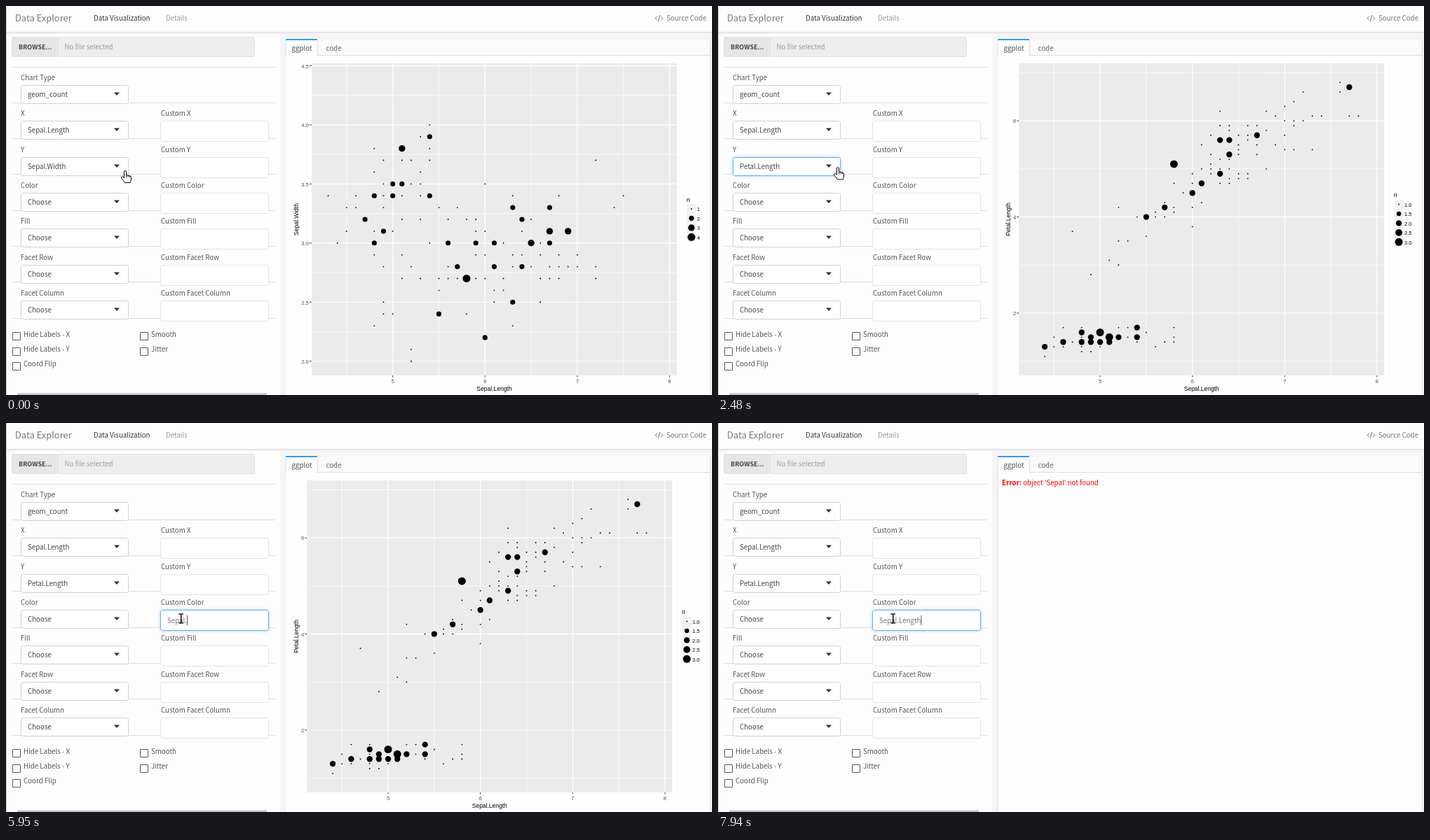
Animation, 1007 px wide and 556 px high, one loop 8000 ms. Source, as an HTML page with a canvas:

```html
<!DOCTYPE html>
<html lang="en">
<head>
<meta charset="utf-8">
<title>Data Explorer</title>
<style>
html, body { margin: 0; width: 100%; height: 100%; overflow: hidden; background: #fff; }
canvas { display: block; width: 1007px; height: 556px; }
</style>
</head>
<body>
<canvas id="stage"></canvas>
<script>
const W = 1007, H = 556, LOOP = 8000;
const canvas = document.getElementById('stage');
const ctx = canvas.getContext('2d');
const dpr = window.devicePixelRatio || 1;
canvas.width = W * dpr;
canvas.height = H * dpr;

const UI = '"Noto Sans CJK JP", "Noto Sans CJK SC", "Noto Sans CJK", "Noto Sans", sans-serif';
const CHART = '"Liberation Sans", Arial, sans-serif';
const SIZE = 9.72;

function seeded(seed) {
  return () => {
    seed = (seed * 1664525 + 1013904223) % 4294967296;
    return seed / 4294967296;
  };
}

// Key points [x, y, count = 2] on a grid of tenths, then single points
// scattered around the trend line of each cluster.
function scatter({ keys, clusters, range: [low, high], seed }) {
  const points = new Map();
  const add = (x, y, n) => points.set(x + ',' + y, { x: x / 10, y: y / 10, n });
  const random = seeded(seed);
  const normal = () => 2 * (random() + random() + random() - 1.5);
  keys.forEach(([x, y, n = 2]) => add(x, y, n));
  for (const c of clusters) {
    const goal = points.size + c.n;
    while (points.size < goal) {
      const dx = normal() * c.sx;
      const x = Math.round(c.x + dx);
      const y = Math.round(c.y + c.slope * dx + normal() * c.sy);
      const inside = x >= 43 && x <= 79 && y >= low && y <= high;
      if (inside && !points.has(x + ',' + y)) add(x, y, 1);
    }
  }
  return [...points.values()];
}

const plots = {
  'Sepal.Width': {
    left: 435.8, low: 1.88, high: 4.52, max: 4, digits: 1, first: 2, step: 0.5,
    legend: ['1', '2', '3', '4'], legendY: 290, titleY: 277,
    points: scatter({
      seed: 7, range: [20, 44],
      keys: [[54, 39], [51, 38, 3], [50, 35], [51, 35], [48, 34], [50, 34], [54, 34],
        [63, 33], [67, 33], [47, 32], [64, 32], [49, 31], [67, 31, 3], [69, 31, 3],
        [48, 30], [56, 30], [59, 30], [61, 30], [65, 30, 3], [67, 30], [57, 28],
        [61, 28], [64, 28], [58, 27, 4], [63, 25], [55, 24], [60, 22]],
      clusters: [
        { n: 28, x: 50, sx: 3.6, y: 34.3, slope: 0.75, sy: 2.4 },
        { n: 61, x: 62.6, sx: 7.5, y: 28.6, slope: 0.24, sy: 3 }
      ]
    })
  },
  'Petal.Length': {
    left: 429.2, low: 0.705, high: 7.195, max: 3, digits: 0, first: 2, step: 2,
    legend: ['1.0', '1.5', '2.0', '2.5', '3.0'], legendY: 283.5, titleY: 270,
    points: scatter({
      seed: 11, range: [10, 69],
      keys: [[44, 13], [46, 14], [48, 14], [48, 16], [49, 14], [49, 15], [50, 14],
        [50, 16, 3], [51, 14], [51, 15, 3], [52, 15], [54, 15], [54, 17],
        [55, 40], [57, 42], [58, 51, 3], [60, 45], [61, 47], [63, 49], [63, 56],
        [64, 53], [64, 56], [67, 57], [77, 67]],
      clusters: [
        { n: 22, x: 50, sx: 4, y: 14.7, slope: 0.1, sy: 2 },
        { n: 76, x: 62.8, sx: 7, y: 48.8, slope: 1.02, sy: 4.4 }
      ]
    })
  }
};

// Each step overrides part of the state and then holds.
const steps = [
  [0, { y: 'Sepal.Width', cursor: ['hand', 170, 235], focus: '', open: false, pick: 2, caret: false, typed: 0, error: false }],
  [490, { cursor: ['hand', 152, 233] }],
  [1010, { cursor: ['beam', 152.7, 233.5], focus: 'y', open: true, caret: true }],
  [1480, { cursor: ['hand', 135, 303], caret: false }],
  [2010, { cursor: ['hand', 135, 318], caret: true, pick: 3 }],
  [2480, { cursor: ['hand', 171, 230.5], open: false, caret: false, y: 'Petal.Length' }],
  [2990, { cursor: ['arrow', 201.5, 258.5] }],
  [3470, { cursor: ['beam', 225, 278.5] }],
  [3960, { cursor: ['beam', 249.7, 279.5] }],
  [4470, { focus: 'color', typed: 1 }],
  [4950, { typed: 3 }],
  [5450, { typed: 4 }],
  [5950, { typed: 6 }],
  [6430, { typed: 7, error: true }],
  [6940, { typed: 9 }],
  [7420, { typed: 11 }],
  [7940, { typed: 12 }]
];

function rect(x, y, w, h, fill) {
  ctx.fillStyle = fill;
  ctx.fillRect(x, y, w, h);
}

function line(x1, y1, x2, y2, color, width = 1) {
  ctx.strokeStyle = color;
  ctx.lineWidth = width;
  ctx.beginPath();
  ctx.moveTo(x1, y1);
  ctx.lineTo(x2, y2);
  ctx.stroke();
}

function box(x, y, w, h, r, fill, stroke) {
  ctx.beginPath();
  ctx.roundRect(x, y, w, h, r);
  ctx.fillStyle = fill;
  ctx.fill();
  ctx.shadowColor = 'transparent';
  ctx.strokeStyle = stroke;
  ctx.lineWidth = 1;
  ctx.stroke();
}

// y is the middle of the capital letters
function text(str, x, y, color = '#555', size = SIZE, { font = UI, weight = 400, align = 'left' } = {}) {
  ctx.font = `${weight} ${size}px ${font}`;
  ctx.textAlign = align;
  ctx.fillStyle = color;
  ctx.fillText(str, x, y + size * 0.37);
  return ctx.measureText(str).width;
}

const label = (str, x, y, color, size, align = 'left') =>
  text(str, x, y, color, size, { font: CHART, align });

function dot(x, y, r) {
  ctx.fillStyle = '#000';
  ctx.beginPath();
  ctx.arc(x, y, r, 0, 7);
  ctx.fill();
}

function field(x, y, w, h, focused, idle) {
  if (focused) {
    ctx.shadowColor = 'rgba(102,175,233,.65)';
    ctx.shadowBlur = 5 * dpr;
  }
  box(x, y, w, h, 3, '#fff', focused ? '#66afe9' : idle);
}

function select(value, y, focused, open, caret) {
  field(21.5, y - 12.5, 153, 26, focused, '#d0d0d0');
  const w = text(value, 31, y + 0.3, '#444');
  if (caret) line(31.5 + w, y - 7, 31.5 + w, y + 7, '#333');
  const d = open ? -2.5 : 2.5;
  ctx.fillStyle = '#333';
  ctx.beginPath();
  ctx.moveTo(154, y - d);
  ctx.lineTo(162, y - d);
  ctx.lineTo(158, y + d * 0.8);
  ctx.fill();
}

function checkboxes(names, x) {
  names.forEach((name, i) => {
    const y = 469.3 + i * 21.3;
    box(x + 0.5, Math.round(y) - 2.5, 11, 11, 0.5, '#fff', '#555');
    text(name, x + 16, y);
  });
}

function drawHeader() {
  rect(0, 0, W, 38, '#fdfdfd');
  rect(0, 37, W, 1, '#dcdcdc');
  rect(0, 38, W, 2, '#f0f0f0');
  text('Data Explorer', 13, 17, '#777', 12.9);
  text('Data Visualization', 125, 17, '#333');
  text('Details', 228, 17, '#999');
  ctx.lineJoin = 'miter';
  ctx.strokeStyle = '#777';
  ctx.lineWidth = 1;
  ctx.stroke(new Path2D('M929 14.5L926 17.5L929 20.5M932.5 13L930.5 22M934 14.5L937 17.5L934 20.5'));
  text('Source Code', 942, 17, '#777');
}

function drawForm(s) {
  rect(0, 40, 391, 516, '#fdfdfd');
  box(74.5, 44.5, 280, 28, 2, '#eee', '#e0e0e0');
  box(8.5, 44.5, 65.5, 28, 2, '#e6e6e6', '#e2e2e2');
  text('BROWSE...', 18, 58.5, '#444', 9, { weight: 700 });
  text('No file selected', 83.5, 58.5, '#999');

  for (let i = 0; i < 8; i++) rect(9, Math.round(86.5 + i * 51.3), 375, 1, '#ddd');

  const names = ['Chart Type', 'X', 'Y', 'Color', 'Fill', 'Facet Row', 'Facet Column'];
  const values = ['geom_count', 'Sepal.Length', s.y];
  names.forEach((name, i) => {
    const y = 102.3 + i * 51.35, mid = Math.round(126 + i * 51.35);
    text(name, 21, y);
    const onY = i === 2 && s.focus === 'y';
    select(values[i] || 'Choose', mid, onY, onY && s.open, onY && s.caret);
    if (!i) return;
    text('Custom ' + name, 221, y);
    const typing = i === 3 && s.focus === 'color';
    field(220.5, mid - 12.5, 154, 29, typing, '#e4e4e4');
    if (typing) {
      const w = text('Sepal.Length'.slice(0, s.typed), 230, mid + 2, '#777');
      line(230.5 + w, mid - 5, 230.5 + w, mid + 9, '#555');
    }
  });

  checkboxes(['Hide Labels - X', 'Hide Labels - Y', 'Coord Flip'], 9);
  checkboxes(['Smooth', 'Jitter'], 191);
  rect(16, 553.5, 356, 2.5, '#c4c4c4');
  rect(0, 0, 1, H, '#d0d0d0');
}

function drawMenu(s) {
  ctx.shadowColor = 'rgba(0,0,0,.25)';
  ctx.shadowBlur = 7 * dpr;
  ctx.shadowOffsetY = 3 * dpr;
  box(21.5, 245.5, 154, 127.5, 2, '#fff', '#d6d6d6');
  ctx.shadowOffsetY = 0;
  rect(22, 248.5 + s.pick * 20.15, 153, 20.15, '#f5f5f5');
  ['Choose', 'Sepal.Length', 'Sepal.Width', 'Petal.Length', 'Petal.Width', 'Species']
    .forEach((name, i) => text(name, 31, 258.5 + i * 20.15, '#444'));
}

function drawPanel() {
  rect(391, 40, 616, 516, '#f5f5f5');
  rect(399, 48, 606, 508, '#fdfdfd');
  rect(444, 48, 561, 23, '#fafafa');
  rect(444, 70, 561, 1, '#ddd');
  rect(398.5, 48, 1, 508, '#e2e2e2');
  rect(1004, 48, 1, 508, '#e2e2e2');
  rect(444, 49, 1, 22, '#ddd');
  rect(399, 47, 45, 2, '#3a9ad9');
  text('ggplot', 407.5, 60, '#555');
  text('code', 456.5, 60, '#666');
}

function drawPlot(name) {
  const p = plots[name], top = 82, height = 446, width = 521.2;
  const px = v => p.left + (v - 4.12) * width / 3.96;
  const py = v => top + (p.high - v) * height / (p.high - p.low);
  const radius = n => 0.92 * (1 + 5 * Math.sqrt((n - 1) / (p.max - 1)));
  const right = p.left + width, bottom = top + height;
  const across = (v, w) => line(p.left, py(v), right, py(v), '#fff', w);
  const down = (v, w) => line(px(v), top, px(v), bottom, '#fff', w);

  rect(399, 72, 605, 484, '#fefefe');
  rect(p.left, top, width, height, '#ebebeb');
  for (let v = p.first - p.step / 2; v < p.high; v += p.step) {
    if (v > p.low) across(v, 0.7);
  }
  for (let v = p.first; v < p.high; v += p.step) {
    across(v, 1.2);
    line(p.left - 3, py(v), p.left, py(v), '#444');
    label(v.toFixed(p.digits), p.left - 4, py(v) + 0.5, '#4d4d4d', 7.6, 'right');
  }
  for (let v = 5; v <= 8; v++) {
    down(v - 0.5, 0.7);
    down(v, 1.2);
    line(px(v), bottom, px(v), bottom + 2.5, '#444');
    label(v, px(v), 536.5, '#4d4d4d', 7.6, 'center');
  }
  p.points.forEach(d => dot(px(d.x), py(d.y), radius(d.n)));

  label('Sepal.Length', p.left + width / 2, 547, '#000', 8.5, 'center');
  ctx.save();
  ctx.translate(414, 305);
  ctx.rotate(-Math.PI / 2);
  label(name, 0, 0, '#000', 8.5, 'center');
  ctx.restore();

  const lx = right + 20.7;
  label('n', lx - 7, p.titleY, '#000', 8.5);
  p.legend.forEach((n, i) => {
    const y = p.legendY + i * 13.45;
    rect(lx - 6.7, y - 6.7, 13.4, 13.4, '#f2f2f2');
    dot(lx, y, radius(+n));
    label(n, lx + 8, y + 0.5, '#000', 7.4);
  });
}

function drawError() {
  const w = text('Error:', 405, 85.5, '#f00', SIZE, { weight: 700 });
  text(" object 'Sepal' not found", 405 + w, 85.5, '#f00');
}

const shapes = {
  hand: new Path2D('M-1.5 1Q0 -1 1.5 1V7Q3 5.8 4 7.4Q5.7 6.4 6.4 8.2Q8.4 7.6 8.5 9.8V13Q8.3 15.5 7 17.5H-.5Q-2 14.5-5 11.5Q-6.4 9.3-4.6 8.8Q-3 8.6-1.5 10.8Z'),
  arrow: new Path2D('M0 0V15.5L3.6 12.2L6 17.7L8.4 16.7L6 11.3H11Z')
};

function drawCursor([kind, x, y]) {
  ctx.save();
  ctx.translate(x, y);
  if (kind === 'beam') {
    line(0, -6.5, 0, 6.5, '#000', 1.4);
    line(-3.3, -6.5, 3.3, -6.5, '#000', 1.3);
    line(-3.3, 6.5, 3.3, 6.5, '#000', 1.3);
  } else {
    ctx.fillStyle = '#fff';
    ctx.fill(shapes[kind]);
    ctx.strokeStyle = '#000';
    ctx.lineWidth = 1;
    ctx.lineJoin = 'round';
    ctx.stroke(shapes[kind]);
    if (kind === 'hand') [1.5, 4, 6.4].forEach(k => line(k, 7, k, 10, '#000', 0.8));
  }
  ctx.restore();
}

function draw(t) {
  const s = Object.assign({}, ...steps.filter(([at]) => at <= t).map(([, change]) => change));
  ctx.setTransform(dpr, 0, 0, dpr, 0, 0);
  rect(0, 0, W, H, '#fff');
  drawHeader();
  drawPanel();
  drawForm(s);
  if (s.error) drawError();
  else drawPlot(s.y);
  if (s.open) drawMenu(s);
  drawCursor(s.cursor);
}

const start = performance.now();
function tick() {
  draw((performance.now() - start) % LOOP);
  requestAnimationFrame(tick);
}
draw(0);
requestAnimationFrame(tick);
</script>
</body>
</html>
```
